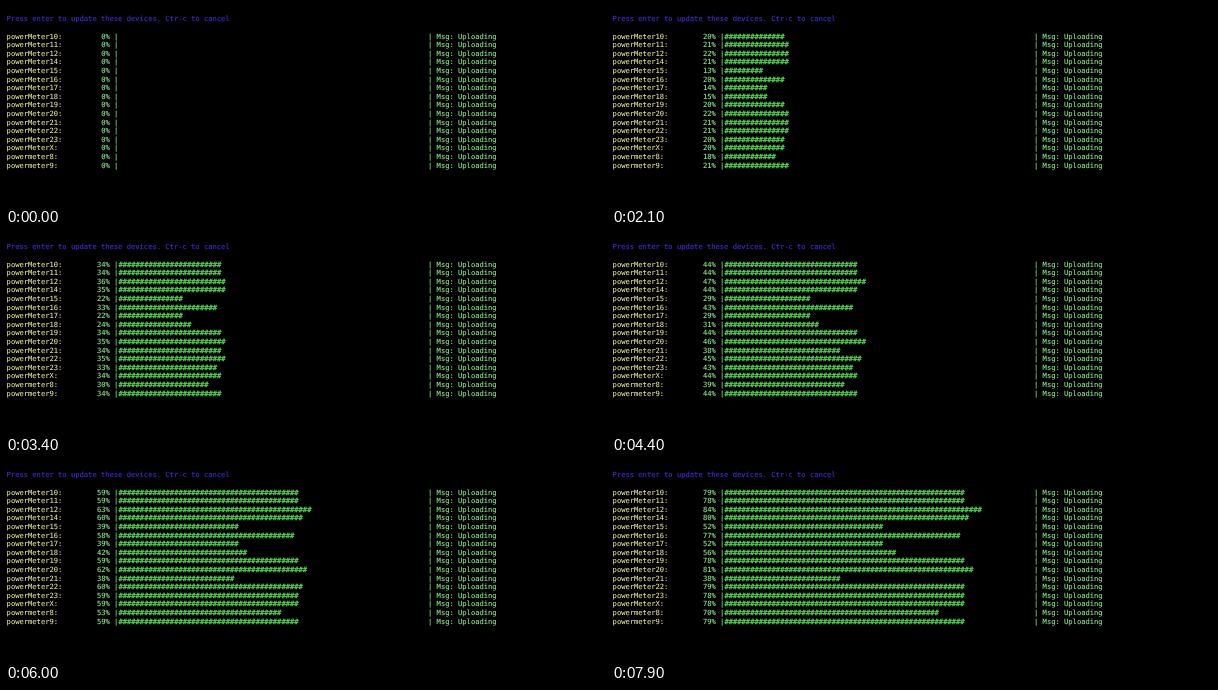
An HTML page that plays this animation: 600x200 px, repeating every 8000 ms.

```html
<!DOCTYPE html>
<html lang="en">
<head>
<meta charset="utf-8">
<title>Device update progress</title>
<style>
  html, body { margin: 0; width: 100%; height: 100%; overflow: hidden; background: #000; }
  svg { display: block; width: 600px; height: 200px; }
  text {
    font: 7.143px "DejaVu Sans Mono", "Liberation Mono", monospace;
    text-rendering: geometricPrecision;
    white-space: pre;
    fill: var(--ink);
    stroke: var(--ink);
    stroke-width: 0.1px;
  }
  .prompt { --ink: #4030d8; }
  .name { --ink: #e6e69a; }
  .info { --ink: #92ee92; }
  .bar { --ink: #5ce65c; stroke-width: 0.25px; }
</style>
</head>
<body>
<svg id="term" viewBox="0 0 600 200"></svg>
<script>
const LOOP = 8000, STEP = 100;
const CELL = 4.3, LINE = 8.6, LEFT = 0.6, BASE = 15.3, BAR_WIDTH = 72;
const times = [0, 1200, 2100, 3400, 4400, 6000, 7900];

// device name, percent at each time after the start, optional stall
const devices = [
  ["powerMeter10", [11, 20, 34, 44, 59, 79]],
  ["powerMeter11", [12, 21, 34, 44, 59, 78]],
  ["powerMeter12", [13, 22, 36, 47, 63, 84]],
  ["powerMeter14", [12, 21, 35, 44, 60, 80]],
  ["powerMeter15", [7, 13, 22, 29, 39, 52]],
  ["powerMeter16", [11, 20, 33, 43, 58, 77]],
  ["powerMeter17", [8, 14, 22, 29, 39, 52]],
  ["powerMeter18", [8, 15, 24, 31, 42, 56]],
  ["powerMeter19", [12, 20, 34, 44, 59, 78]],
  ["powerMeter20", [12, 22, 35, 46, 62, 81]],
  ["powerMeter21", [12, 21, 34, 44, 59, 78], 38],
  ["powerMeter22", [12, 21, 35, 45, 60, 79]],
  ["powerMeter23", [12, 20, 33, 43, 59, 78]],
  ["powerMeterX", [12, 20, 34, 44, 59, 78]],
  ["powermeter8", [11, 18, 30, 39, 53, 70]],
  ["powermeter9", [12, 21, 34, 44, 59, 79]]
];

const term = document.getElementById("term");

function put(col, row, style, content = "") {
  const el = document.createElementNS("http://www.w3.org/2000/svg", "text");
  el.setAttribute("x", LEFT + col * CELL);
  el.setAttribute("y", BASE + row * LINE);
  el.setAttribute("class", style);
  el.textContent = content;
  term.append(el);
  return el;
}

put(0, 0, "prompt", "Press enter to update these devices. Ctr-c to cancel");

const rows = devices.map(([name, marks, stall = 100], i) => {
  const row = i + 2;
  put(0, row, "name", name + ":");
  put(25, row, "info", "|");
  put(98, row, "info", "|");
  put(100, row, "info", "Msg: Uploading");
  return {
    // half a percent keeps each mark in the middle of its step
    marks: [0, ...marks.map(m => m + 0.5)],
    stall,
    label: [21, 22].map(col => put(col, row, "info")),
    bar: put(26, row, "bar")
  };
});

function percentAt(marks, t) {
  let i = 1;
  while (i < times.length - 1 && t > times[i]) i++;
  const k = (t - times[i - 1]) / (times[i] - times[i - 1]);
  return Math.floor(marks[i - 1] + (marks[i] - marks[i - 1]) * k);
}

function draw(t) {
  for (const { marks, stall, label, bar } of rows) {
    const percent = Math.min(stall, percentAt(marks, t));
    label[0].textContent = percent > 9 ? percent + "%" : "";
    label[1].textContent = percent > 9 ? "" : percent + "%";
    bar.textContent = "#".repeat(Math.floor(percent * BAR_WIDTH / 100));
  }
}

function tick() {
  const t = performance.now() % LOOP;
  draw(Math.floor(t / STEP) * STEP);
  requestAnimationFrame(tick);
}
tick();
</script>
</body>
</html>
```
